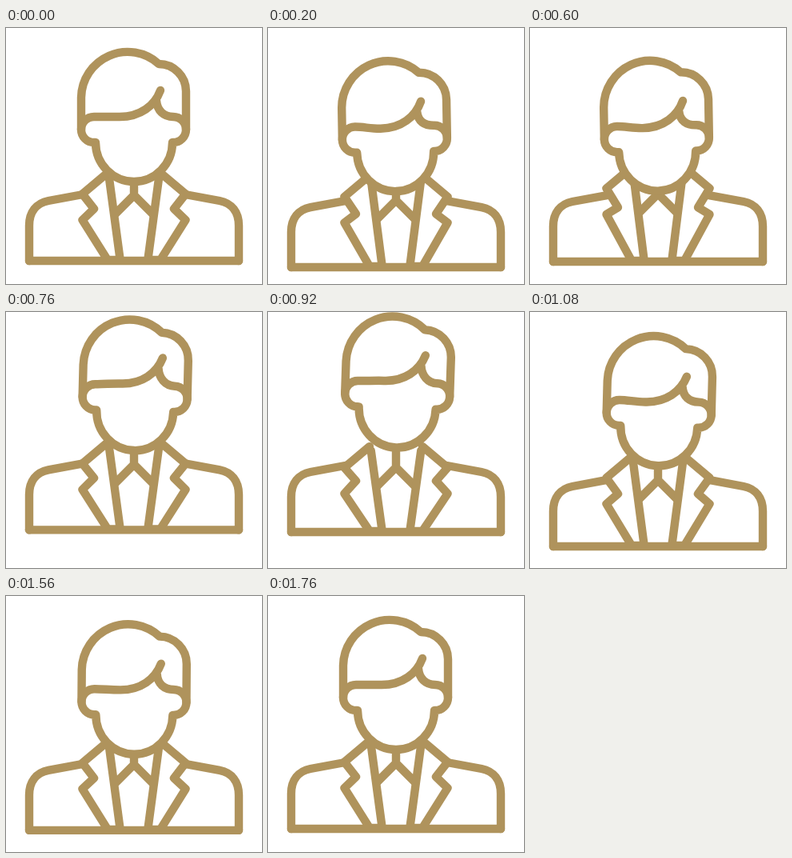
Recreate the animation shown at these times as an HTML page. Size 320 px wide and 320 px high, loop 2200 ms.

```html
<!DOCTYPE html>
<html lang="en">
<head>
<meta charset="utf-8">
<title>Bouncing businessman</title>
<style>
  html, body { margin: 0; width: 100%; height: 100%; overflow: hidden; background: #fff; }
  svg { display: block; width: 100%; height: 100%; }
  .line { fill: none; stroke: #af935c; stroke-width: 10.4; stroke-linecap: round; stroke-linejoin: round; }
  .solid { fill: #fff; }
</style>
</head>
<body>
<svg viewBox="0 0 320 320" class="line">
  <defs>
    <path id="shoulder" d="M29 291V247C29 230 38 219 53 216L99 207.500"/>
    <path id="lapel" class="solid"/>
  </defs>
  <g id="body">
    <use href="#shoulder"/>
    <use href="#shoulder" transform="matrix(-1 0 0 1 320 0)"/>
  </g>
  <path id="shirt" d="M160 190V209M137 232L160 209L183 232"/>
  <use href="#lapel"/>
  <use href="#lapel" transform="matrix(-1 0 0 1 320 0)"/>
  <path id="base" d="M29 291H291"/>
  <g id="head">
    <path class="solid" d="M110 143A16 16 0 0 1 94 127V87A58 58 0 0 1 191 45A34 34 0 0 1 225 79V127A16 16 0 0 1 209 143L208 143A48 49 0 0 1 112 143Z"/>
    <path id="fringe"/>
  </g>
</svg>
<script>
const LOOP = 2200, STEP = 40, BEAT = 400;

const el = id => document.getElementById(id);
const mix = (a, b, t) => a + (b - a) * t;
const smooth = t => t * t * (3 - 2 * t);
const ease = (time, from, to) => smooth(Math.min(1, Math.max(0, (time - from) / (to - from))));

// Eases to a crouch, a jump and a rebound, one beat apart, then back to rest.
function swing(time, crouch, jump, rebound, lag = 0, rest = 1760) {
  const first = BEAT + 20 + lag;
  let value = crouch * ease(time, 0, first);
  value += (jump - crouch) * ease(time, first, first + BEAT);
  value += (rebound - jump) * ease(time, first + BEAT, first + 2 * BEAT);
  return value - rebound * ease(time, first + 2 * BEAT, rest);
}

// The corners follow the collar, the lower ends stay on the base bar.
function lapelPath(collar, shirt, body) {
  return `M127 ${181 + collar}L95.5 ${207.5 + collar}L110 ${226 + shirt}L95.5 ${240 + collar}`
    + `L127 ${290 + body}H142.7L128.7 ${186 + collar}`;
}

function fringePath(sag) {
  const y = 111 + sag;
  return `M94 127A16 16 0 0 1 110 111C120 111 130 ${y} 142 ${y}`
    + `C168 ${y} 186 ${y - 14} 193 ${y - 33}`
    + `M188 ${y - 20}C189 ${y - 8} 197 111 209 111A16 16 0 0 1 225 127`;
}

function render(time) {
  const body = swing(time, 17.3, -21, 11, 0, 1680);
  const collar = swing(time, 6.5, -18.5, 4, -30);
  const head = swing(time, 29, -26, 17, 30);
  const tilt = swing(time, -2.4, 2, 1.2, 30);
  const sag = swing(time, 6, -2, 3);
  const shirt = mix(collar, body, 0.65);
  const stretch = 1 + Math.abs(head) / 2200;

  const shift = (id, y) => el(id).setAttribute("transform", `translate(0 ${y})`);
  shift("body", body);
  shift("base", body);
  shift("shirt", shirt);
  el("lapel").setAttribute("d", lapelPath(collar, shirt, body));
  el("fringe").setAttribute("d", fringePath(sag));
  el("head").setAttribute("transform",
    `translate(160 ${191 + head}) rotate(${tilt}) scale(1 ${stretch}) translate(-160 -191)`);
}

const start = performance.now();
function tick() {
  const time = (performance.now() - start) % LOOP;
  render(Math.floor(time / STEP) * STEP);
  requestAnimationFrame(tick);
}
tick();
</script>
</body>
</html>
```
